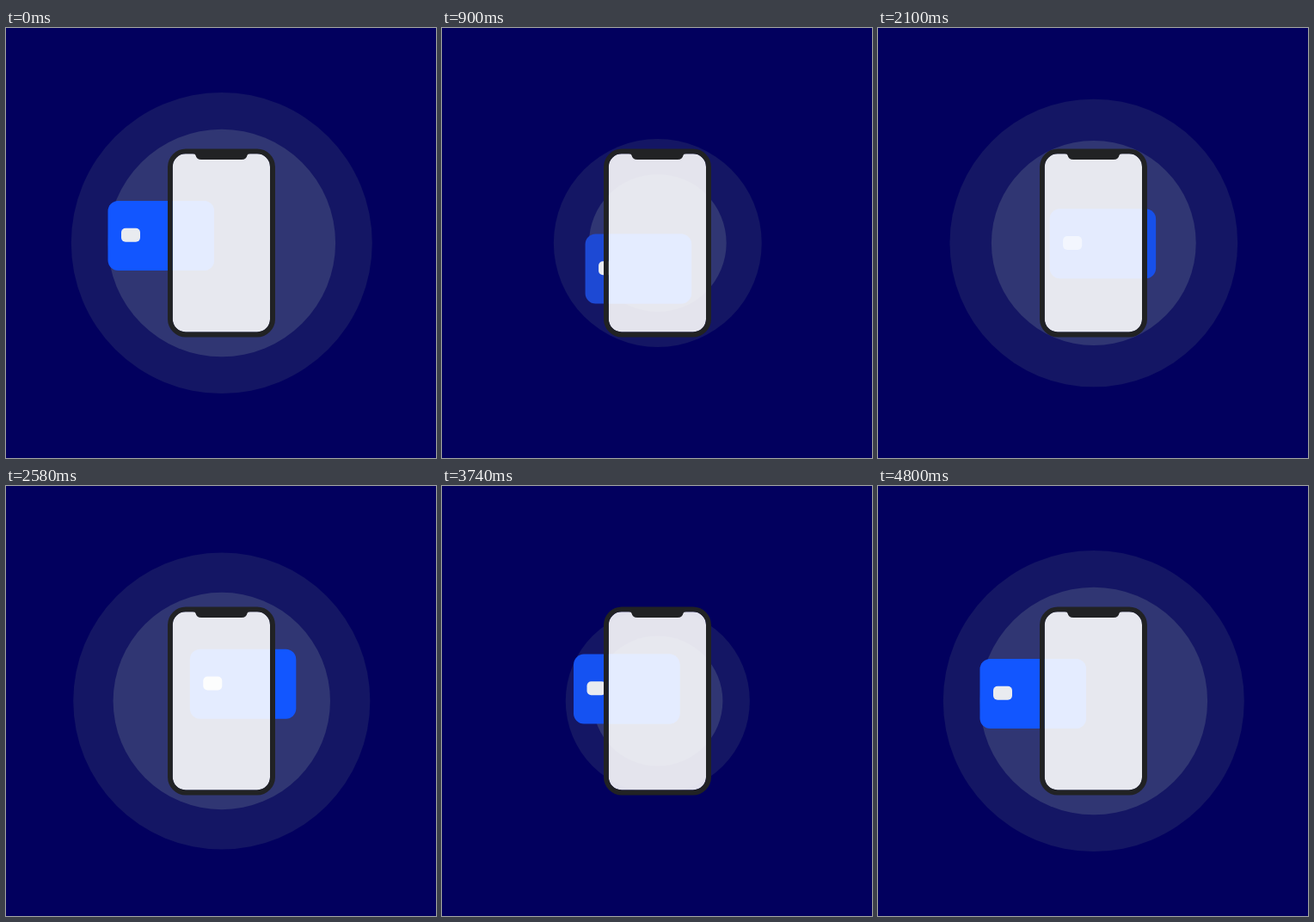
Animation of 500 by 500 pixels, one loop 4.82 s. Source, as an HTML page with a canvas:

```html
<!DOCTYPE html>
<html lang="en">
<head>
<meta charset="utf-8">
<title>Card and phone</title>
<style>
  html, body { margin: 0; width: 100%; height: 100%; overflow: hidden; background: #02005e; }
  canvas { display: block; width: 500px; height: 500px; }
</style>
</head>
<body>
<canvas id="stage" width="500" height="500"></canvas>
<script>
const ctx = document.getElementById('stage').getContext('2d');
const LOOP = 4820;

function bezier(x1, y1, x2, y2) {
  const at = (a, b, s) => 3 * a * s * (1 - s) ** 2 + 3 * b * s * s * (1 - s) + s ** 3;
  return x => {
    let lo = 0, hi = 1;
    for (let i = 0; i < 24; i++) {
      const mid = (lo + hi) / 2;
      if (at(x1, x2, mid) < x) lo = mid; else hi = mid;
    }
    return at(y1, y2, (lo + hi) / 2);
  };
}
const ease = bezier(.25, .1, .25, 1);
const linear = x => x;

// Each segment: [start, end, from, to, easing]
function track(segments) {
  return t => {
    let value = segments[0][2];
    for (const [start, end, from, to, easing] of segments) {
      if (t < start) break;
      value = from + (to - from) * easing(Math.min(1, (t - start) / (end - start)));
    }
    return value;
  };
}

const outerRadius = track([
  [0, 1310, 175, 105, bezier(.49, 0, .59, 1)],
  [1310, 2400, 105, 175, bezier(.29, 0, .5, 1)],
  [2400, 3600, 175, 105, bezier(.49, 0, .59, 1)],
  [3600, 4800, 105, 175, bezier(.41, 0, .51, 1)]
]);
const innerRadius = track([
  [0, 1310, 132.3, 75, bezier(.29, 0, .31, 1)],
  [1310, 2400, 75, 132.3, bezier(.52, 0, .67, 1)],
  [2400, 3600, 132.3, 75, bezier(.29, 0, .31, 1)],
  [3600, 4800, 75, 132.3, bezier(.69, 0, .71, 1)]
]);
const triangle = (a, b, c) => track([
  [0, 1610, a, b, ease],
  [1610, 3040, b, c, ease],
  [3100, 4800, c, a, ease]
]);
const cardX = triangle(118.5, 174.7, 216.7);
const cardY = triangle(201, 246, 185.7);
const dimming = track([
  [0, 900, 0, 1, linear],
  [1700, 2500, 1, 0, linear],
  [3000, 3740, 0, .3, linear],
  [3740, 4800, .3, 0, linear]
]);
const chipBehindGlass = track([
  [1650, 2400, 0, 1, linear],
  [2650, 2950, 1, 0, linear]
]);

function disc(radius, color) {
  ctx.fillStyle = color;
  ctx.beginPath();
  ctx.arc(250.8, 250, radius, 0, 2 * Math.PI);
  ctx.fill();
}

function rounded(x, y, w, h, r, color) {
  ctx.fillStyle = color;
  ctx.beginPath();
  ctx.roundRect(x, y, w, h, r);
  ctx.fill();
}

const screen = new Path2D();
screen.roundRect(193.8, 146.3, 113.2, 207.2, 15);
const frame = new Path2D(screen);
frame.roundRect(188, 140.5, 125, 219, 21);
const notch = new Path2D(
  'M217 146H284Q281 146 280.5 148Q279.5 153 274 153H227Q221.5 153 220.5 148Q220 146 217 146Z');

function draw(t) {
  ctx.fillStyle = '#02005e';
  ctx.fillRect(0, 0, 500, 500);
  disc(outerRadius(t), '#141664');
  disc(innerRadius(t), '#303673');

  const x = cardX(t), y = cardY(t), dim = dimming(t);
  const blue = `rgb(${18 + 11 * dim}, ${86 - 13 * dim}, ${255 - 43 * dim})`;
  const card = color => rounded(x, y, 123.5, 81, 12, color);
  card(blue);
  rounded(x + 15.5, y + 31.7, 22, 16, 5, '#e9ebf0');

  ctx.save();
  ctx.clip(screen);
  ctx.globalAlpha = 1 - chipBehindGlass(t);
  card('#1256ff');
  ctx.restore();

  ctx.fillStyle = 'rgba(255, 255, 255, .886)';
  ctx.fill(screen);
  ctx.fillStyle = '#212224';
  ctx.fill(frame, 'evenodd');
  ctx.fill(notch);
}

const begin = performance.now();
function tick() {
  draw((performance.now() - begin) % LOOP);
  requestAnimationFrame(tick);
}
tick();
</script>
</body>
</html>
```
